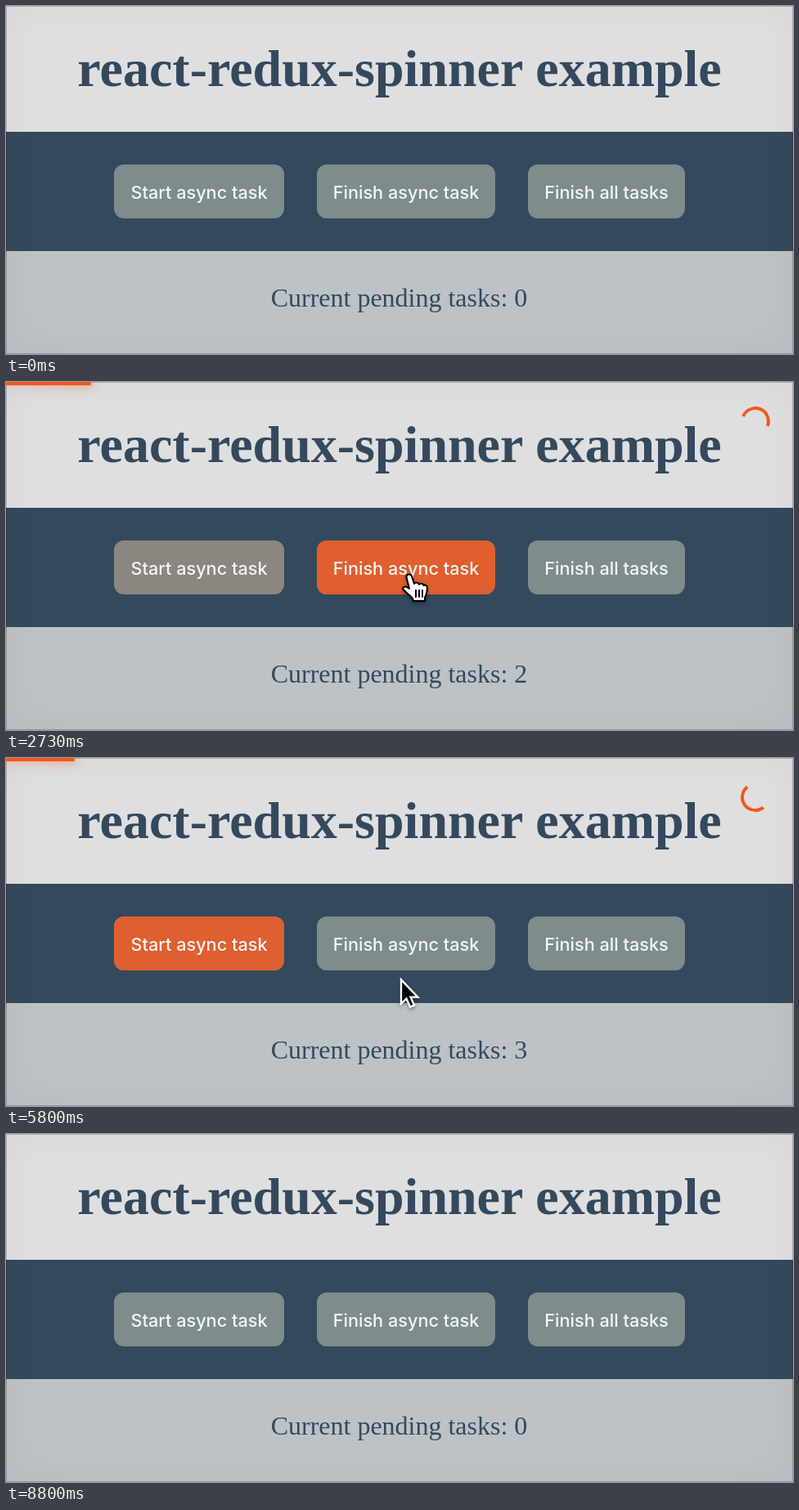
An HTML page that plays this animation: 962x426 px, repeating every 8870 ms.

```html
<!DOCTYPE html>
<html lang="en">
<head>
<meta charset="utf-8">
<title>Spinner example</title>
<style>
  html, body { margin: 0; width: 100%; height: 100%; overflow: hidden; }
  #stage { position: relative; width: 962px; height: 426px; overflow: hidden; background: #dfdfdf; }
  svg, .shade, #progress { position: absolute; left: 0; top: 0; width: 962px; height: 426px; }
  .title { font: bold 64px "Liberation Serif", "Times New Roman", serif; }
  .count { font: 32px "Liberation Serif", "Times New Roman", serif; }
  .title, .count { fill: #34495e; text-anchor: middle; }
  .label { font: 500 21.7px Inter, sans-serif; fill: #f4f5f5; text-anchor: middle; }
  .button { fill: #7f8c8c; }
  .glow { fill: #f1581f; }
  .shade { box-shadow: inset 0 0 0 1px rgba(0,0,0,.2), inset 0 0 50px rgba(0,0,20,.04); }
  #progress { overflow: hidden; }
  #bar { position: absolute; left: 0; top: 0; width: 100%; height: 4px; background: #f1581f; }
  #peg {
    position: absolute; right: 0; width: 200px; height: 100%;
    box-shadow: 0 0 20px #f1581f, 0 0 10px #f1581f;
    transform: rotate(3deg) translate(0, -8px);
  }
  #spinner {
    position: absolute; left: 898px; top: 30px; width: 36px; height: 36px; box-sizing: border-box;
    border: 4px solid transparent; border-top-color: #f1581f; border-left-color: #f1581f; border-radius: 50%;
  }
  #hand, #arrow { filter: drop-shadow(0 2px 2px rgba(0,0,0,.4)); }
</style>
</head>
<body>
<div id="stage">
  <svg viewBox="0 0 962 426">
    <rect y="154" width="962" height="146" fill="#34495d"/>
    <rect y="300" width="962" height="126" fill="#bdc2c6"/>
    <text class="title" x="481" y="98">react-redux-spinner example</text>
    <g id="buttons"></g>
    <text class="count" x="480.5" y="368">Current pending tasks: <tspan id="count">0</tspan></text>
  </svg>
  <div class="shade"></div>
  <div id="progress">
    <div id="bar"><div id="peg"></div></div>
    <div id="spinner"></div>
  </div>
  <svg viewBox="0 0 962 426">
    <g id="cursor">
      <g id="ring" fill="none">
        <circle cx="-1" cy="-3" r="61.5" stroke="#fff" stroke-width="5.5"/>
        <circle cx="-1" cy="-3" r="61.5" stroke="#000" stroke-width="3.5"/>
      </g>
      <g id="hand" stroke="#000" stroke-width="2" stroke-linejoin="round" stroke-linecap="round">
        <path fill="#fff" d="M-3.5 4C-4 0 2-1 3 3L6 12C7 10 11 10 12 13C13 11 17 11.5 17.5 14C19 12.5 22 14 22 17C22 23 20 26 19 29V33H5L4 30C1 26-4 23-7 19.5C-9 17-6 14.5-3 16L0 18Z"/>
        <path fill="none" d="M8 20v8M12 20v8M16 20v8"/>
      </g>
      <path id="arrow" stroke="#fff" stroke-width="2.4" d="M1 2V31.5L7.5 25.3L12 35.5L17 33.3L12.6 23.5H21.5Z"/>
    </g>
  </svg>
</div>
<script>
const LOOP = 8870, FRAMES = 133;
const MOVE = 200, FADE = 300, PRESS = 140, SPEED = 200, TRICKLE = 800, SPIN = 400;
const $ = id => document.getElementById(id);
const clamp = x => Math.min(1, Math.max(0, x));
const smooth = x => x * x * (3 - 2 * x);

// The CSS "ease" curve: solve x(s) by bisection, then return y(s)
function ease(x) {
  let low = 0, high = 1, s = .5;
  for (let i = 0; i < 20; i++) {
    if (.75 * s * (1 - s) + s ** 3 < x) low = s; else high = s;
    s = (low + high) / 2;
  }
  return .3 * s * (1 - s) ** 2 + 3 * s * s * (1 - s) + s ** 3;
}
const ramp = (t, start, length) => ease(clamp((t - start) / length));

// Each button's action changes the number of pending tasks
const buttons = [
  { label: 'Start async task', x: 132, width: 208, action: n => n + 1 },
  { label: 'Finish async task', x: 380, width: 218, action: n => n - 1 },
  { label: 'Finish all tasks', x: 638, width: 192, action: () => 0 },
];

// Where the pointer rests, when it leaves, and when it clicks there
const stops = [
  { x: 340, y: 460, leave: 640, clicks: [] },
  { x: 247, y: 236, leave: 2460, clicks: [1060, 1730] },
  { x: 493, y: 235, leave: 3830, clicks: [3000, 3490] },
  { x: 268, y: 235, leave: 5711, clicks: [4694, 5030, 5370] },
  { x: 761, y: 234, leave: 7050, clicks: [6860] },
  { x: 835, y: -60, leave: LOOP, clicks: [] },
];

// Pointer moves sag slightly, in proportion to their sideways length
function pointer(t) {
  let { x, y } = stops[0];
  for (let i = 1; i < stops.length; i++) {
    const from = stops[i - 1], to = stops[i];
    const p = smooth(clamp((t - from.leave) / MOVE));
    x += (to.x - from.x) * p;
    y += (to.y - from.y) * p + .072 * Math.abs(to.x - from.x) * Math.sin(Math.PI * p);
  }
  return { x, y };
}

const buttonAt = ({ x, y }) =>
  buttons.find(b => x >= b.x && x <= b.x + b.width && y >= 194 && y <= 260);

// Run through the pointer's path once to find when it enters and leaves each button
buttons.forEach(b => { b.edges = [{ time: -FADE, on: false }]; });
for (let time = 0; time < LOOP; time += 10) {
  const hovered = buttonAt(pointer(time));
  for (const b of buttons) {
    const on = b === hovered;
    if (on !== b.edges[b.edges.length - 1].on) b.edges.push({ time, on });
  }
}

// Play the clicks once: task counts, and the runs of the progress bar
const clicks = [], runs = [];
let tasks = 0;
for (const stop of stops) {
  for (const time of stop.clicks) {
    const before = tasks;
    tasks = buttonAt(stop).action(before);
    clicks.push({ time, tasks });
    if (before === 0) runs.push({ start: time, pace: 1.7 - runs.length });
    if (tasks === 0) runs[runs.length - 1].done = time;
  }
}

const latest = (list, key, t) => list.filter(item => item[key] <= t).pop();

function glow(button, t) {
  const { time, on } = latest(button.edges, 'time', t);
  const p = ramp(t, time, FADE);
  return on ? p : 1 - p;
}

// The bar starts at 8%, trickles on, and finishes in two leaps
function percent({ start, done, pace }, t) {
  let value = 8 * ramp(t, start + 30, SPEED);
  for (let at = start + TRICKLE; at < done; at += TRICKLE) value += pace * ramp(t, at, SPEED);
  value += 43 * ramp(t, done, SPEED);
  return value + (100 - value) * ramp(t, done + SPEED, SPEED);
}

function drawProgress(t) {
  const run = latest(runs, 'start', t);
  $('progress').style.opacity = run ? 1 - clamp((t - run.done) / SPEED - 2) : 0;
  if (!run) return;
  $('bar').style.transform = `translateX(${percent(run, t) - 100}%)`;
  $('spinner').style.transform = `rotate(${(t - run.start) / SPIN}turn)`;
}

function drawPointer(t) {
  const at = pointer(t);
  const show = (id, visible) => { $(id).style.opacity = visible ? 1 : 0; };
  $('cursor').setAttribute('transform', `translate(${at.x} ${at.y})`);
  show('hand', buttonAt(at));
  show('arrow', !buttonAt(at));
  show('ring', clicks.some(({ time }) => t >= time - PRESS && t < time));
}

$('buttons').innerHTML = buttons.map(({ label, x, width }) => {
  const box = `x="${x}" y="194" width="${width}" height="66" rx="12"`;
  return `<rect class="button" ${box}/><rect class="glow" ${box}/>
    <text class="label" x="${x + width / 2}" y="236">${label}</text>`;
}).join('');
const glows = document.querySelectorAll('.glow');

const begin = performance.now();
function render() {
  // A small lead keeps clock rounding from showing the previous frame
  const elapsed = Math.max(0, performance.now() - begin) + 10;
  const t = Math.floor(elapsed / LOOP * FRAMES) % FRAMES * LOOP / FRAMES;
  buttons.forEach((b, i) => { glows[i].style.opacity = glow(b, t); });
  const click = latest(clicks, 'time', t);
  $('count').textContent = click ? click.tasks : 0;
  drawProgress(t);
  drawPointer(t);
  requestAnimationFrame(render);
}
render();
</script>
</body>
</html>
```
